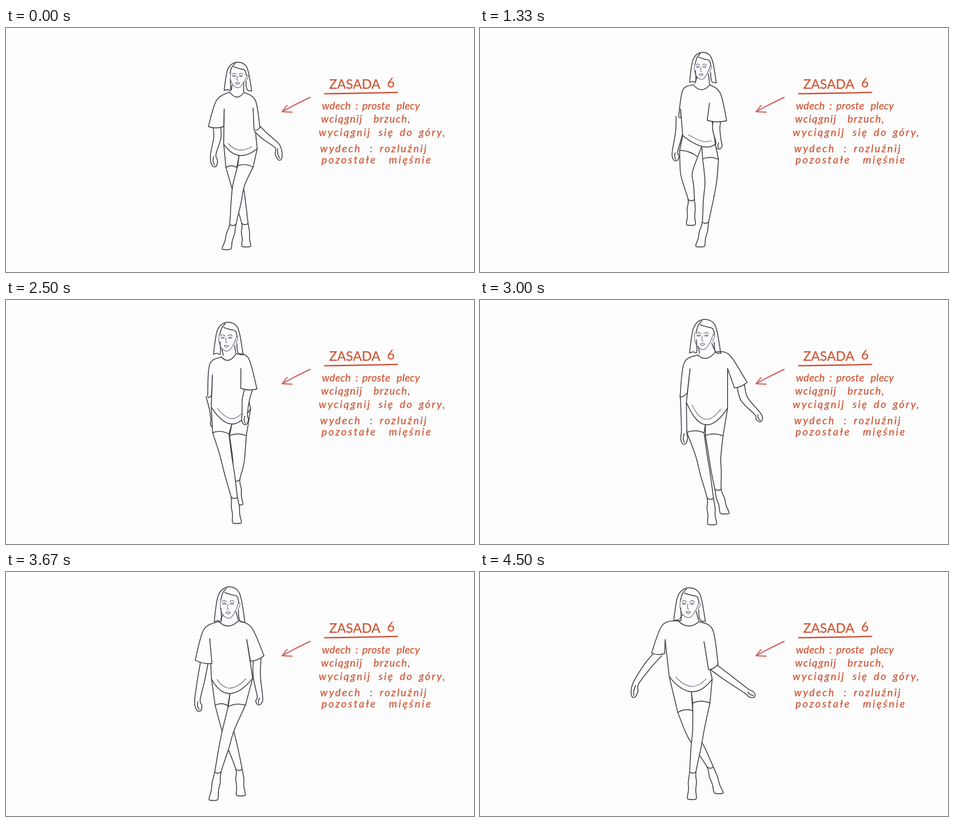
An HTML page that plays this animation: 1034 px wide and 542 px high, repeating every 4670 ms.

```html
<!DOCTYPE html>
<html lang="pl">
<head>
<meta charset="utf-8">
<title>Zasada 6</title>
<style>
html, body { margin: 0; width: 100%; height: 100%; overflow: hidden; background: #fdfdfd; }
svg { display: block; width: 100vw; height: 100vh; }
path { fill: none; stroke-linecap: round; stroke-linejoin: round; }
#figure path { fill: #fdfdfd; stroke: #41414a; stroke-width: 1.9; }
#figure .line { fill: none; }
#figure .thin { fill: none; stroke: #5d5e76; stroke-width: 1.3; }
text { font-family: Lato, "Open Sans", sans-serif; fill: #d0593a; stroke: #d0593a; stroke-width: .4; }
#note { font-size: 23px; font-style: italic; }
#title { font-size: 29px; }
#rule { stroke: #d0553a; stroke-width: 3.2; }
#arrow { stroke: #d0605a; stroke-width: 2.5; }
</style>
</head>
<body>
<svg viewBox="0 0 1034 542">
  <g id="figure"></g>
  <path id="arrow" d="M672 154Q640 169 610 186L621 172M610 186L632 187"/>
  <path id="rule" d="M704 146Q780 145 865 143"/>
  <g id="title"><text x="714" y="135">ZASADA</text><text x="842" y="132">6</text></g>
  <g id="note">
    <g letter-spacing=".4"><text x="698" y="181">wdech</text><text x="772" y="181">:</text><text x="787" y="181">proste</text><text x="863" y="181">plecy</text></g>
    <g letter-spacing="1.8"><text x="696" y="210">wciągnij</text><text x="812" y="210">brzuch,</text></g>
    <g letter-spacing="3"><text x="691" y="240">wyciągnij</text><text x="823" y="240">się</text><text x="870" y="240">do</text><text x="912" y="240">góry,</text></g>
    <g letter-spacing="3"><text x="694" y="276">wydech</text><text x="804" y="276">:</text><text x="826" y="276">rozluźnij</text></g>
    <g letter-spacing="3.4"><text x="697" y="301">pozostałe</text><text x="846" y="301">mięśnie</text></g>
  </g>
</svg>
<script>
const LOOP = 4670;

// head: hair box and turn of the face
// torso: collar ends, left shoulder, sleeve, armpit, three hem points, then the right side back up
// arms: elbow, wrist, fingertip; legs: cuff ends, knee, ankle, toe
const standing = {
  step: 0, front: 'right', head: '482 76 61 64 3',
  torso: '494 142 526 143 465 161 447 219 481 219 482 180 481 258 515 283 555 268 546 178 548 226 561 221 551 161',
  arms: '467 243 458 280 461 307 573 241 599 262 605 292',
  legs: '486 310 510 310 511 352 528 435 531 486 512 306 546 309 514 350 501 437 487 492'
};
const reaching = {
  step: 4, front: 'right', head: '469 68 62 68 2',
  torso: '484 135 513 136 446 146 427 208 444 213 454 172 460 249 500 271 541 251 528 165 537 222 552 217 541 152',
  arms: '431 235 409 275 407 294 562 229 618 232 631 250',
  legs: '469 309 500 307 496 358 517 428 530 480 500 294 536 295 514 345 498 436 487 489'
};
const lifting = {
  step: 8, front: 'left', head: '463 54 59 68 -2',
  torso: '471 126 508 126 448 138 439 196 444 197 443 180 448 239 490 263 520 258 507 167 502 205 545 206 531 145',
  arms: '440 232 431 273 433 294 522 225 527 252 528 268',
  legs: '441 272 481 286 456 322 467 382 466 438 492 291 527 292 510 340 498 432 486 486'
};
const turning = {
  step: 12, front: 'left', head: '454 56 62 69 0',
  torso: '471 131 497 123 449 146 449 215 450 217 448 180 451 249 500 274 534 242 491 153 475 197 519 212 520 136',
  arms: '462 230 466 240 468 246 476 222 443 256 437 282',
  legs: '456 295 490 300 482 345 500 437 508 493 490 302 525 301 509 370 493 432 486 487'
};
const swinging = {
  step: 18, front: 'left', head: '463 43 69 76 -4',
  torso: '481 122 520 115 451 140 442 215 458 206 464 153 456 227 498 277 547 240 547 152 562 195 590 183 551 122',
  arms: '452 250 451 291 451 319 584 220 612 251 620 269',
  legs: '457 294 495 295 489 345 509 441 513 499 498 301 537 302 519 350 526 421 541 475'
};
const crossing = {
  step: 22, front: 'right', head: '460 33 68 79 0',
  torso: '470 110 514 108 437 128 418 196 455 203 450 148 454 238 495 270 545 236 532 150 540 198 570 186 543 124',
  arms: '431 240 423 283 427 308 554 230 561 276 558 294',
  legs: '462 296 490 297 490 352 515 439 519 497 491 299 529 296 491 352 468 445 458 507'
};
const opening = {
  step: 27, front: 'right', head: '428 35 70 75 0',
  torso: '437 108 484 110 403 118 379 180 408 181 409 150 418 232 467 266 513 238 495 155 505 217 526 205 514 128',
  arms: '371 208 345 246 339 277 545 233 588 264 606 276',
  legs: '437 312 470 308 470 362 509 434 528 492 470 291 508 291 483 347 470 445 468 505'
};

const poses = [standing, reaching, lifting, turning, swinging, crossing, opening];
const bob = [8, 0, -7, 0, -9, 7];                         // sway between poses
const stepping = ['left', '', '', 'right', '', 'left'];   // leg raised between poses

const nums = s => s.split(' ').map(Number);
for (const p of poses)
  for (const part of ['head', 'torso', 'arms', 'legs']) p[part] = nums(p[part]);

const lerp = (a, b, u) => a + (b - a) * u;
const mix = (a, b, u) => a.map((v, i) => lerp(v, b[i], u));
const add = ([x, y], dx, dy) => [x + dx, y + dy];
const pairs = list => list.flatMap((v, i) => i % 2 ? [] : [[v, list[i + 1]]]);
const fmt = p => p.map(v => v.toFixed(1)).join(' ');

// Smooth curve through points.
function curve(pts) {
  const at = i => pts[Math.max(0, Math.min(pts.length - 1, i))];
  const handle = (i, from, to) => fmt(at(i).map((v, a) => v + (at(to)[a] - at(from)[a]) / 6));
  let d = 'M' + fmt(pts[0]);
  for (let i = 0; i < pts.length - 1; i++)
    d += `C${handle(i, i - 1, i + 1)} ${handle(i + 1, i + 2, i)} ${fmt(at(i + 1))}`;
  return d;
}

// Bow from a to b that passes through m.
function arc(a, m, b) {
  const c = m.map((v, i) => 2 * v - (a[i] + b[i]) / 2);
  return `M${fmt(a)}Q${fmt(c)} ${fmt(b)}`;
}
const sag = (a, b, depth) => arc(a, add(mix(a, b, .5), 0, depth), b);
const join = (...parts) => parts.map((d, i) => i ? d.replace(/^M[^CQ]*/, '') : d).join('');
const path = (d, kind = 'shape') => `<path class="${kind}" d="${d}"/>`;

function arm(start, elbow, wrist, tip) {
  const mid = [start, elbow, wrist, mix(wrist, tip, .55), tip];
  const half = [8.5, 8, 6, 7.5, 3.5];
  const edge = side => mid.map((p, i) => {
    const a = mid[Math.max(0, i - 1)], b = mid[Math.min(4, i + 1)];
    const dx = b[0] - a[0], dy = b[1] - a[1], k = side * half[i] / (Math.hypot(dx, dy) || 1);
    return add(p, -dy * k, dx * k);
  });
  const thumb = curve([mix(wrist, tip, .2), add(mix(wrist, tip, .55), -2, 1), mix(wrist, tip, .9)]);
  return path(curve([...edge(1), ...edge(-1).reverse()])) + path(thumb, 'line');
}

function leg([cuffL, cuffR, knee, ankle, toe], raise) {
  knee = add(knee, 0, -raise / 4);
  ankle = add(ankle, 0, -raise);
  toe = add(toe, 0, -raise);
  const foot = t => mix(ankle, toe, t);
  const mid = [knee, mix(knee, ankle, .45), ankle, foot(.35), foot(.65), foot(.93), toe];
  const half = [13, 11, 7, 9, 8, 10, 7];
  const edge = side => mid.map((p, i) => add(p, side * half[i], 0));
  return path(curve([cuffL, ...edge(-1), ...edge(1).reverse(), cuffR])) +
    path(sag(add(ankle, -7, -1), add(ankle, 7, -1), 3), 'line');
}

function shorts(outerHem, outer, inner, crotch) {
  return path(join(curve([outerHem, mix(outerHem, outer, .5), outer]),
    sag(outer, inner, -4), curve([inner, crotch])));
}

function sleeve(collar, shoulder, outer, inner, pit) {
  return path(join(curve([collar, shoulder, outer]), sag(outer, inner, 3), curve([inner, pit])));
}

// Head strokes in percent of the hair's box.
const HAIR = ['0 98 5 61 12 27 27 7 50 0 75 9 88 35 100 100', '0 98 12 95 23 96 22 60',
  '79 66 80 85 86 98 100 99', '40 4 28 17 21 38', '34 16 55 22 74 27 80 45'].map(s => pairs(nums(s)));
const FACE = ['21 38 20 58 29 79 44 88 56 85 70 66 79 45', '79 44 84 49 77 64',
  '45 48 43 61 48 63'].map(s => pairs(nums(s)));
const eye = x => [
  sagPoints(x - 8, x + 8, 42, -4), sagPoints(x - 6, x + 6, 48, -3), sagPoints(x - 6, x + 6, 48, 1)
];
function sagPoints(x1, x2, y, depth) {
  return [[x1, y], [(x1 + x2) / 2, y + depth], [x2, y]];
}
FACE.push(...eye(33), ...eye(58), sagPoints(38, 53, 72, -2), sagPoints(38, 53, 72, 5));

function head([x, y, w, h, turn], collarL, collarR) {
  const place = dx => ([px, py]) => [x + (px + dx) * w / 100, y + py * h / 100];
  const draw = (list, dx) => list.map(s => curve(s.map(place(dx)))).join('');
  const neck = curve([place(0)([28, 80]), add(collarL, 4, -4)]) +
    curve([place(0)([71, 70]), add(collarR, -1, -2)]);
  return path(neck + draw(HAIR, 0), 'line') + path(draw(FACE, turn), 'thin');
}

function drawPose(step) {
  let k = poses.length - 2;
  while (poses[k].step > step) k--;
  const a = poses[k], b = poses[k + 1];
  const u = (step - a.step) / (b.step - a.step);
  const wave = Math.sin(Math.PI * u), dy = bob[k] * wave;
  const points = part => pairs(mix(a[part], b[part], u)).map(p => add(p, 0, dy));

  const [collarL, collarR, shoulderL, outerL, innerL, pitL, hemL, hemMid, hemR,
    pitR, innerR, outerR, shoulderR] = points('torso');
  const arms = points('arms'), legs = points('legs');
  const raise = side => stepping[k] === side ? 26 * wave : 0;

  const limbs = {
    left: leg(legs.slice(0, 5), raise('left')) + shorts(hemL, legs[0], legs[1], hemMid),
    right: leg(legs.slice(5), raise('right')) + shorts(hemR, legs[6], legs[5], hemMid)
  };
  const front = (u < .5 ? a : b).front, back = front === 'left' ? 'right' : 'left';

  const side = (pit, hem) => [pit, mix(pit, hem, .5), hem];
  const shirt = join(curve(side(pitL, hemL)), arc(hemL, hemMid, hemR), curve(side(hemR, pitR)));
  const fold = arc(add(mix(hemL, hemMid, .3), 0, -9), add(hemMid, 0, -12), add(mix(hemR, hemMid, .3), 0, -9));
  const box = mix(a.head, b.head, u);
  box[1] += dy;

  document.getElementById('figure').innerHTML =
    arm(mix(outerL, innerL, .55), ...arms.slice(0, 3)) +
    limbs[back] + limbs[front] +
    path(shirt) + path(fold, 'thin') +
    arm(mix(outerR, innerR, .5), ...arms.slice(3)) +
    sleeve(collarL, shoulderL, outerL, innerL, pitL) +
    sleeve(collarR, shoulderR, outerR, innerR, pitR) +
    path(sag(collarL, collarR, 11), 'line') +
    head(box, collarL, collarR);
}

// Six drawings a second, on times rounded to 10 ms.
const stepTime = n => Math.round(n * 100 / 6) * 10;
function stepAt(t) {
  let n = 27;
  while (stepTime(n) > t) n--;
  return n;
}

let shown = -1;
const start = performance.now();
function tick() {
  const step = stepAt((performance.now() - start) % LOOP);
  if (step !== shown) drawPose(shown = step);
  requestAnimationFrame(tick);
}
tick();
</script>
</body>
</html>
```
